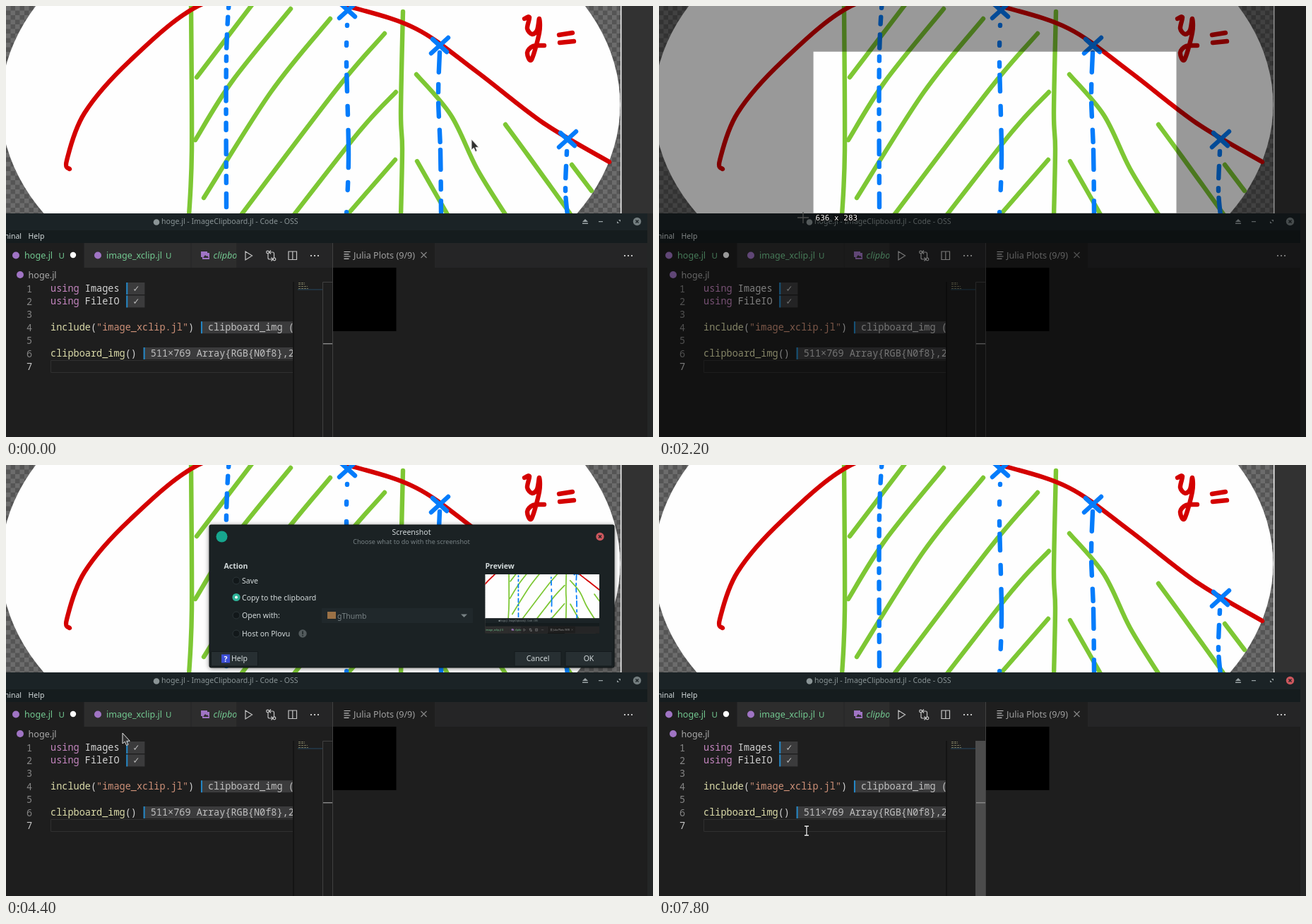
Animation, 916 px wide and 611 px high, one loop 8000 ms. Source, as an HTML page:

```html
<!DOCTYPE html>
<html lang="en">
<head>
<meta charset="utf-8">
<title>Clipboard screenshot</title>
<style>
html, body { margin: 0; width: 100%; height: 100%; overflow: hidden; background: #1e1e1e; }
svg { display: block; }
text { font: 10.5px "Noto Sans", sans-serif; fill: #d3dadb; white-space: pre; }
.tab { font-size: 12.6px; fill: #73c991; }
.status { font-size: 11.5px; }
.italic { font-style: italic; }
.code { font: 13.55px "Noto Sans Mono", "DejaVu Sans Mono", monospace; fill: #d4d4d4; }
.keyword { fill: #c586c0; }
.call { fill: #dcdcaa; }
.string { fill: #ce9178; }
.bold { font-weight: bold; }
.mid { text-anchor: middle; }
.faint { fill: #788285; }
.ink { fill: none; stroke-linecap: round; stroke-linejoin: round; stroke-width: 6.4; }
.icon { fill: none; stroke: #c5c5c5; stroke-width: 1.2; }
.dots { fill: none; stroke: #c5c5c5; stroke-width: 2; stroke-dasharray: 2 3; }
#size { font: 11px "DejaVu Sans Mono", monospace; fill: #fff; stroke: #000; stroke-width: 2px; paint-order: stroke; }
#dialog { filter: drop-shadow(0 1px 3px rgba(0,0,0,.5)); }
</style>
</head>
<body>
<svg width="916" height="611" viewBox="0 0 916 611">
<defs>
  <pattern id="checks" width="13" height="13" patternUnits="userSpaceOnUse">
    <path fill="#555" d="M0 0h13v13H0z"/>
    <path fill="#6c6c6c" d="M0 0h6.5v13H13V6.5H0z"/>
  </pattern>
</defs>

<g id="scene">
  <path fill="#323232" d="M0 0h916v611H0z"/>
  <path fill="url(#checks)" d="M0 0h870v295H0z"/>
  <ellipse cx="431" cy="140" rx="438.5" ry="303" fill="#fefefe"/>
  <path fill="#f4f4f4" d="M870 0h1.500v295H870z"/>
  <g id="green" class="ink" stroke="#7dc734"/>
  <g id="red" class="ink" stroke="#d40000"/>
  <g id="blue" class="ink" stroke="#047cfb"/>

  <path fill="#242626" d="M0 294h916v317H0z"/>
  <path fill="#1e1e1e" d="M0 294h908v317H0z"/>
  <path fill="#1b2326" d="M0 294h908v24H0z"/>
  <path fill="#151c1e" d="M0 318h908v18H0z"/>
  <circle cx="213" cy="306.500" r="4.300" fill="#8a9496"/>
  <text x="220" y="309" style="font-size:10.55px;fill:#8a9496">hoge.jl - ImageClipboard.jl - Code - OSS</text>
  <g fill="#99a2a4">
    <path d="M816 306l4-4 4 4zM816 307.500h8v1.500h-8zM839 305h6v1.300h-6zM867 303h3v3zM865 308v-3l3 3z"/>
    <circle id="close" cx="893.500" cy="305.500" r="5.700" fill="#737d7f"/>
  </g>
  <path d="M891.500 303.500l4 4m0-4l-4 4" stroke="#1b2326" stroke-width="1.300"/>
  <text x="22" y="330" text-anchor="end">Terminal</text>
  <text x="31.500" y="330">Help</text>

  <path fill="#252526" d="M0 336h908v35H0z"/>
  <path fill="#1e1e1e" d="M0 336h110v35H0zM463 336h144v35H463z"/>
  <path fill="#2d2d2d" d="M111 336h150.500v35H111zM262.500 336h64v35h-64z"/>
  <g fill="#a074c4">
    <circle cx="14" cy="353.500" r="5"/><circle cx="130" cy="353.500" r="5"/><circle cx="20" cy="381" r="5"/>
    <path d="M276 348h9v2h3v9h-10v-3h-2z"/>
  </g>
  <path fill="#2d2d2d" d="M279 357l3-4 2 2 1-1 2 3z"/>
  <text class="tab" x="26" y="358">hoge.jl</text>
  <text class="tab status" x="74.500" y="357.500">U</text>
  <circle cx="95" cy="353" r="4.200" fill="#fff"/>
  <text class="tab" x="142" y="358">image_xclip.jl</text>
  <text class="tab status" x="226" y="357.500">U</text>
  <text class="tab italic" x="293.500" y="358">clipboard.png</text>
  <path fill="#252526" d="M326.500 336H462v35H326.500z"/>
  <g class="icon">
    <path d="M339 348v12l9.500-6zM400 348h11.500v11.500H400zM405.800 348v11.500"/>
    <path d="M371 351v6q0 2 2 2h5M375.500 356.500l2.500 2.500-2.500 2.500M379.500 357v-6q0-2-2-2h-5M375 346.500l-2.500 2.500 2.500 2.500"/>
    <circle cx="370.500" cy="349" r="1.800"/><circle cx="380" cy="359" r="1.800"/>
    <path d="M478.500 348.500h9M478.500 351.800h7M478.500 355h9M478.500 358.300h7"/>
    <path stroke="#858585" style="stroke:#858585" d="M587.500 349l8 8m0-8l-8 8"/>
  </g>
  <path class="dots" d="M431 354h12"/><path class="dots" d="M875 354h12"/>
  <text class="tab" x="492" y="358" style="fill:#a0a0a0">Julia Plots (9/9)</text>
  <text class="tab" x="31.500" y="386" style="fill:#a9a9a9">hoge.jl</text>

  <path fill="none" stroke="#303030" d="M63.500 502.500H410v17H63.500z"/>
  <g id="editor"/>
  <path fill="#1e1e1e" d="M407 391h55v220h-55z"/>
  <path fill="#141414" d="M406 391h2v220h-2z"/>
  <path stroke="#77765c" stroke-dasharray="3 1" d="M414 392.500h9M414 394.500h9M414 397.500h13M414 400.500h14"/>
  <path fill="#264960" d="M413 401.500h35v1h-35z"/>
  <path fill="none" stroke="#414141" d="M462 391.500H448.500V611M462.500 336V611"/>
  <path id="scrollbar" fill="#4c4c4c" d="M448 391h14v220h-14z"/>
  <path fill="#858585" d="M449 478h13v1.500h-13z"/>
  <path d="M463 371h89.500v90H463z"/>
  <path id="caret" fill="#d0d0d0" d="M63 502h1.800v18.500H63z"/>
</g>

<g id="dialog">
  <rect x="288" y="85" width="573" height="202" rx="2" fill="#1b2224" stroke="#0d1213"/>
  <circle cx="305.500" cy="101.500" r="8" fill="#17a68e"/>
  <text class="mid" x="574" y="99">Screenshot</text>
  <text class="mid faint" x="574" y="112" style="font-size:9.06px">Choose what to do with the screenshot</text>
  <circle cx="841" cy="101.500" r="5.700" fill="#cc575d"/>
  <path d="M839 99.500l4 4m0-4l-4 4" stroke="#1b2224" stroke-width="1.300"/>
  <text class="bold" x="308.500" y="147">Action</text>
  <text class="bold" x="678.500" y="147">Preview</text>
  <g fill="#12181a" stroke="#2c3538">
    <circle cx="326" cy="164" r="5"/><circle cx="326" cy="213" r="5"/><circle cx="326" cy="239" r="5"/>
  </g>
  <circle cx="326" cy="187.500" r="5.600" fill="#2eb398"/><circle cx="326" cy="187.500" r="2" fill="#fff"/>
  <text x="334" y="168">Save</text>
  <text x="334" y="191.500">Copy to the clipboard</text>
  <text x="334" y="217">Open with:</text>
  <text x="334" y="243">Host on Plovu</text>
  <circle cx="420" cy="239" r="5.700" fill="#535b5d"/>
  <path fill="#1b2224" d="M419.300 235.500h1.500v4.500h-1.500zM419.300 241h1.500v1.500h-1.500z"/>
  <rect x="447" y="203" width="214" height="21" rx="1" fill="#20282b"/>
  <path fill="#9a7146" d="M455 208h12v10h-12z"/>
  <text class="faint" x="469" y="217.500">gThumb</text>
  <path fill="#788285" d="M644 211.500h9l-4.500 4.500z"/>
  <g fill="#272f32" stroke="#141a1c">
    <path d="M290.500 264.500h66v20.500h-66zM720 264.500h66v20.500h-66z"/>
    <path id="ok" d="M792 264.500h66v20.500h-66z"/>
  </g>
  <path fill="#3d4fd8" d="M305 268.500h12v12h-12z"/>
  <text class="mid bold" x="311" y="278.500" style="fill:#fff">?</text>
  <text x="319" y="278">Help</text>
  <text class="mid" x="753" y="278">Cancel</text>
  <text class="mid" x="825" y="278">OK</text>
  <svg x="678.500" y="155" width="161.500" height="83.800" viewBox="139.500 64.700 593 307.800"><use href="#scene"/></svg>
</g>

<path id="dim" fill="#000" fill-opacity=".4" fill-rule="evenodd"/>
<text id="size"></text>
<path id="cross" d="M-8 0H8M0 -8V8" stroke="#4c4e4d" stroke-width="1.300"/>
<path id="arrow" d="M0 0V15L3.300 12.200 5.600 17.500 8 16.400 5.800 11.300H10.300Z" fill="#303030" stroke="#e4e4e4"/>
<g id="beam" fill="none">
  <path d="M-3 -7H3M0 -7V6M-3 6H3" stroke="#111" stroke-width="3.400"/>
  <path d="M-3 -7H3M0 -7V6M-3 6H3" stroke="#eee" stroke-width="1.300"/>
</g>
</svg>

<script>
const $ = id => document.getElementById(id);
const add = (id, markup) => $(id).insertAdjacentHTML('beforeend', markup);

// Smooth path through "x,y x,y ..." (Catmull-Rom)
function curve(list) {
  const p = list.split(' ').map(pair => pair.split(',').map(Number));
  const at = i => p[Math.min(Math.max(i, 0), p.length - 1)];
  const handle = (i, side) => [0, 1].map(c => at(i)[c] + side * (at(i + 1)[c] - at(i - 1)[c]) / 6);
  return 'M' + p[0] + p.slice(1).map((end, i) => `C${handle(i, 1)} ${handle(i + 1, -1)} ${end}`).join('');
}
const ink = (id, list, dashes = 'none') =>
  add(id, `<path d="${curve(list)}" stroke-dasharray="${dashes}"/>`);

// Handwritten sketch: area borders, hatching, curve, crosses and dashed ordinates
['262,-4 263,205 259,298', '562,8 559,150 561,202 559,298',
  '350,-4 270,101', '403,4 320,107 268,190', '459,18 375,122 280,272', '536,39 468,118 330,300',
  '552,122 500,178 403,302', '551,218 478,302',
  '581,97 630,155 667,231 710,300', '582,220 627,299', '707,168 740,213 802,299', '801,225 829,262'
].forEach(list => ink('green', list));

['90,231 86,219 111,152 175,78 272,0 380,-26 483,0 580,32 665,92 761,166 854,221',
  '734,18 741,16 738,32 745,40 752,34 755,18 755,38 744,76 738,66 746,57 762,56',
  '783,41 802,38', '784,52 804,50'
].forEach(list => ink('red', list));

for (const [x, y] of [[484, 6], [614, 56], [795, 189]]) {
  ink('blue', `${x - 12},${y + 11} ${x + 12},${y - 11}`);
  ink('blue', `${x - 10},${y - 9} ${x + 10},${y + 9}`);
}
ink('blue', '318,-34 312,70 312,295', '19 12 6 13 10 15');
ink('blue', '483,27 482,80 485,210 482,296', '1 24 4 24 6 12 23 21 12 22 53 21 11 31');
ink('blue', '614,66 612,130 615,205 616,297', '28 17 11 16 19 19 17 11');
ink('blue', '794,206 792,260 795,297', '5 16 17 14 4 10 40');

// Editor lines, each with its inline result
const LEFT = 63, ADVANCE = 8.13, LINE = 18.4;
[
  ['<tspan class="keyword">using</tspan> Images', '✓'],
  ['<tspan class="keyword">using</tspan> FileIO', '✓'],
  [],
  ['<tspan class="call">include</tspan>(<tspan class="string">"image_xclip.jl"</tspan>)', 'clipboard_img ('],
  [],
  ['<tspan class="call">clipboard_img</tspan>()', '511×769 Array{RGB{N0f8},2}'],
  []
].forEach(([source, result], row, rows) => {
  const y = 405 + row * LINE;
  const numberColor = row === rows.length - 1 ? '#c6c6c6' : '#858585';
  add('editor', `<text class="code" x="29" y="${y + .6}" style="fill:${numberColor}">${row + 1}</text>`);
  if (!source) return;
  add('editor', `<text class="code" x="${LEFT}" y="${y}">${source}</text>`);
  const x = LEFT + $('editor').lastElementChild.textContent.length * ADVANCE + 9.7;
  add('editor', `<rect x="${x}" y="${y - 13}" width="${18 + result.length * ADVANCE}" height="17" fill="#3b3b3c"/>
    <rect x="${x}" y="${y - 13}" width="2" height="17" fill="#2388c8"/>
    <text class="code" x="${x + 10}" y="${y}" style="fill:#c0c0c0">${result}</text>`);
});

const LOOP = 8000, STEP = 100, LAG = 90;
const ANCHOR = { x: 732.5, y: 64.7 }, SCREEN_SCALE = 1.2376;
const easeOut = k => Math.sin(k * Math.PI / 2);
const easeInOut = k => (1 - Math.cos(k * Math.PI)) / 2;

// Pointer moves; it rests between them
const START = { x: 659, y: 189 };
const moves = [
  { from: 1000, to: 1500, ...ANCHOR },
  { from: 1600, to: 2200, x: 204, y: 300, ease: easeOut },
  { from: 2200, to: 2400, x: 204, y: 307 },
  { from: 2700, to: 3700, x: 139.5, y: 372.5 },
  { from: 4100, to: 4400, x: 165, y: 380 },
  { from: 4400, to: 4900, x: 577, y: 287 },
  { from: 4900, to: 5000, x: 618, y: 287 },
  { from: 5100, to: 5900, x: 806, y: 278 },
  { from: 6000, to: 6500, x: 242, y: 459 },
  { from: 6600, to: 7100, x: 209, y: 519 }
];

function pointerAt(time) {
  let { x, y } = START;
  for (const move of moves) {
    if (time <= move.from) break;
    const k = (move.ease || easeInOut)(Math.min(1, (time - move.from) / (move.to - move.from)));
    x += (move.x - x) * k;
    y += (move.y - y) * k;
  }
  return { x, y };
}

const show = (id, visible) => { $(id).style.display = visible ? '' : 'none'; };
const place = (id, p) => $(id).setAttribute('transform', `translate(${p.x} ${p.y})`);

function drawSelection(time, selecting) {
  const corner = pointerAt(time - LAG);
  const hole = selecting ? `M${ANCHOR.x} ${ANCHOR.y}H${corner.x}V${corner.y}H${ANCHOR.x}Z` : '';
  $('dim').setAttribute('d', `M0 0H916V611H0Z${hole}`);
  place('size', { x: corner.x + 3, y: corner.y + 11 });
  const width = Math.round((ANCHOR.x - corner.x) * SCREEN_SCALE);
  const height = Math.round((corner.y - ANCHOR.y) * SCREEN_SCALE);
  $('size').textContent = `${width} x ${height}`;
}

function render(now) {
  const time = Math.floor(now % LOOP / STEP) * STEP;
  const capturing = time >= 600 && time < 4100;
  const selecting = capturing && time >= 1700;
  const focused = time >= 6300;
  const p = pointerAt(time);

  if (capturing) drawSelection(time, selecting);
  show('size', selecting);
  show('dim', capturing);
  show('cross', capturing);
  show('arrow', !capturing && !focused);
  show('beam', focused);
  for (const id of ['cross', 'arrow', 'beam']) place(id, p);

  show('dialog', time >= 4300 && time < 6000);
  $('ok').style.fill = p.x > 792 ? '#2eb398' : '';
  $('close').style.fill = focused ? '#cc575d' : '';
  show('scrollbar', focused);
  show('caret', focused && Math.floor((time - 6300) / 500) % 2 === 0);
}

function frame() {
  render(performance.now());
  requestAnimationFrame(frame);
}
frame();
</script>
</body>
</html>
```
